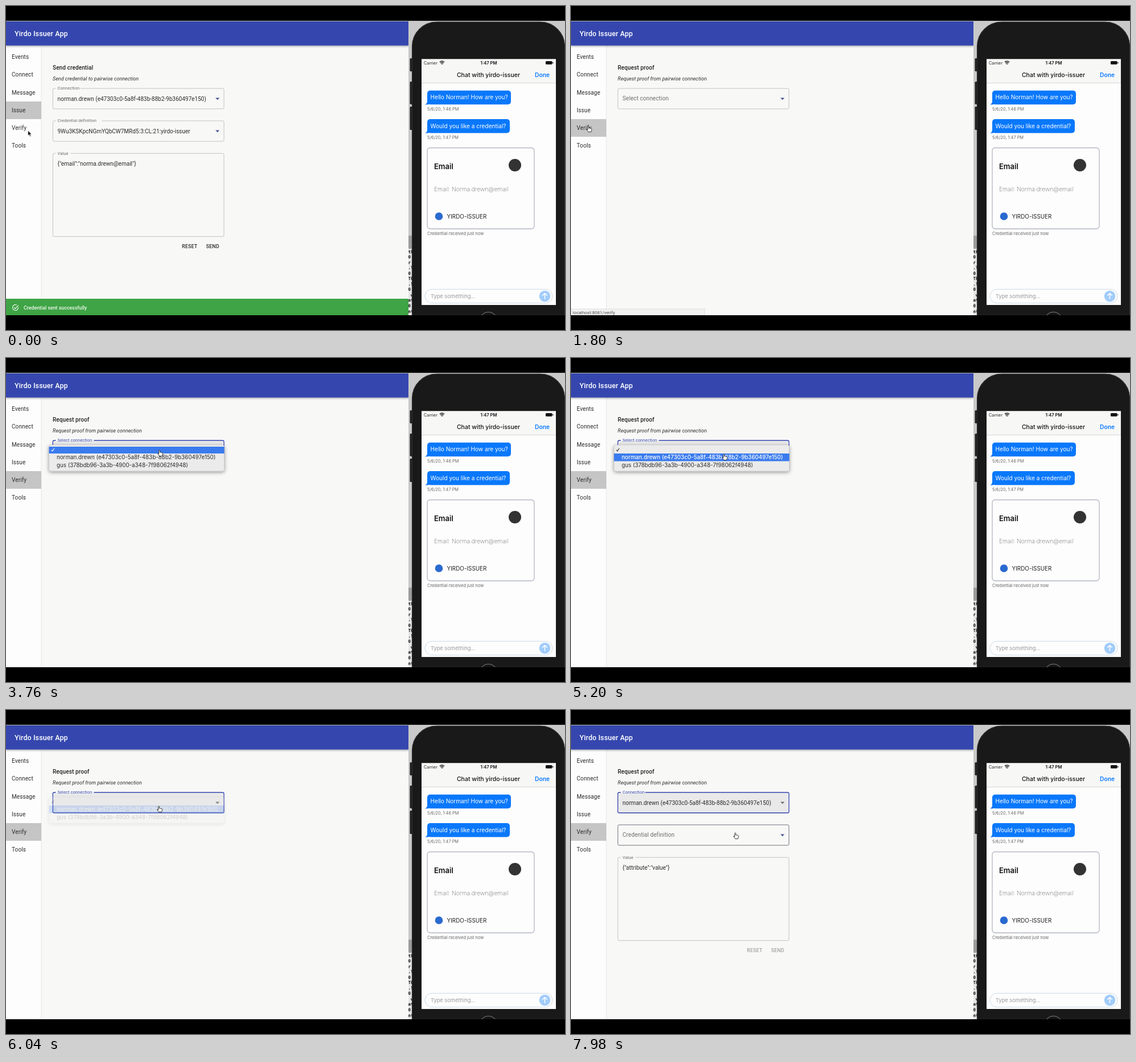
Recreate the animation shown at these times as an HTML page. Size 982 by 570 pixels, loop 8 s.

```html
<!DOCTYPE html>
<html lang="en">
<head>
<meta charset="utf-8">
<title>Issuer demo</title>
<style>
  html, body { margin: 0; width: 100%; height: 100%; overflow: hidden; background: #000; }
  svg { display: block; width: 982px; height: 570px; }
  text { white-space: pre; }
  .web { font-family: Roboto, sans-serif; }
  .ios { font-family: Inter, sans-serif; }
</style>
</head>
<body>
<svg id="stage" viewBox="0 0 982 570"></svg>
<script>
const LOOP = 8000;
const PERSON = "norman.drewn (e47303c0-5a8f-483b-88b2-9b360497e150)";
const OTHER = "gus (378bdb96-3a3b-4900-a348-7f98062f4948)";
const INK = "#2b2b2b", BLUE = "#3546ae", PAPER = "#f8f8f7";

const rect = (x, y, w, h, fill, extra = "") =>
  `<rect x="${x}" y="${y}" width="${w}" height="${h}" fill="${fill}" ${extra}/>`;
const circle = (x, y, r, fill, extra = "") =>
  `<circle cx="${x}" cy="${y}" r="${r}" fill="${fill}" ${extra}/>`;
const path = (d, fill, extra = "") => `<path d="${d}" fill="${fill}" ${extra}/>`;
const group = (id, body, extra = "") => `<g id="${id}" ${extra}>${body}</g>`;
const label = (cls, x, y, size, str, fill = INK, extra = "") =>
  `<text class="${cls}" x="${x}" y="${y}" font-size="${size}" fill="${fill}" ${extra}>${str}</text>`;
const web = (...args) => label("web", ...args);
const ios = (...args) => label("ios", ...args);

// Web app pieces
function field(y, h, name, value, { focus, hover, arrow = true } = {}) {
  const stroke = focus ? BLUE : hover ? "#70707c" : "#c2c2c6";
  let out = rect(82.3, y, 300.6, h, focus ? "#e9e9ea" : "none",
    `rx="2.5" stroke="${stroke}" stroke-width="${focus ? 1.3 : 1}"`);
  if (value === null) {
    out += web(90.5, y + 21, 10, name, "#6c6c6c", 'letter-spacing=".1"');
  } else {
    out += rect(87.5, y - 1, name.length * 3.4 + 9, 2.2, PAPER)
      + web(90.5, y + 2.4, 7.5, name, focus ? BLUE : "#6c6c6c", 'letter-spacing=".07"')
      + web(90.5, y + 21.7, 10, value);
  }
  if (arrow) out += path(`M368 ${y + 16.6}h7l-3.5 3.6z`, focus ? "#6b6b6b" : "#4a549c");
  return out;
}

const heading = (title, note) =>
  web(82, 111.5, 10, title, "#222", 'font-weight="500" letter-spacing=".1"')
  + web(82, 131, 8.9, note, INK, 'font-style="italic" letter-spacing=".08"');

const buttons = fill =>
  web(309, 426, 8.8, "RESET", fill, 'font-weight="500" letter-spacing=".25"')
  + web(351.5, 426, 8.8, "SEND", fill, 'font-weight="500" letter-spacing=".25"');

const selectedRow = y => rect(0, y, 62, 31, "#c5c5c5");

const issuePage = selectedRow(168)
  + heading("Send credential", "Send credential to pairwise connection")
  + field(145, 36, "Connection", PERSON)
  + field(202, 36, "Credential definition", "9Wu3KSKpcNGmYQbCW7MRd5:3:CL:21:yirdo-issuer")
  + field(259.3, 146.3, "Value", '{"email":"norma.drewn@email"}', { arrow: false })
  + buttons(INK)
  + rect(0, 515, 707, 29, "#3fa445")
  + path("M21.5 530a5 5 0 1 1-2.6-3.9M14 530.3l2.2 2.2 5.8-5.8", "none", 'stroke="#fff" stroke-width="1.1"')
  + web(31, 534, 8.8, "Credential sent successfully", "#eef8ee", 'font-weight="500"');

const verifyBase = selectedRow(199) + heading("Request proof", "Request proof from pairwise connection");
const verifyForm = field(145, 36, "Connection", PERSON, { focus: true })
  + group("definition", field(202, 36, "Credential definition", null))
  + group("definitionHover", field(202, 36, "Credential definition", null, { hover: true }))
  + field(259.3, 146.3, "Value", '{"attribute":"value"}', { arrow: false })
  + buttons("#a2a2a2");

const menu = ["Events", "Connect", "Message", "Issue", "Verify", "Tools"]
  .map((name, i) => web(10, 93.3 + i * 31.1, 10, name, INK, 'letter-spacing=".1"')).join("");

function popupRows(active) {
  const ink = i => i === active ? "#fff" : INK;
  const weight = i => `font-weight="${i === active ? 500 : 400}"`;
  return rect(75.5, active ? 168 : 156, 308, active ? 13.5 : 12, "#3a7bee")
    + path("M79.8 161.6l1.7 2.2 3.4-5", "none", `stroke="${ink(0)}" stroke-width="1.1"`)
    + ios(89, 178, 9.75, PERSON, ink(1), weight(1))
    + ios(89, 191.8, 9.75, OTHER, ink(2), weight(2));
}

const popup = rect(75.5, 153, 308, 46, "#ebebeb", 'rx="3.5" stroke="#c0c0c2" stroke-width=".6" filter="url(#lift)"')
  + group("firstRow", popupRows(0)) + group("secondRow", popupRows(1));

const app = rect(0, 26, 707, 518, PAPER)
  + rect(0, 69, 62, 475, "#fdfdfd") + rect(61.5, 69, 1, 475, "#e6e6e5")
  + group("hoverRow", rect(0, 199, 62, 31, "#f1f1f1"))
  + group("issue", issuePage)
  + group("verify", verifyBase
    + group("idle", field(145, 36, "Select connection", null))
    + group("focused", field(145, 36, "Select connection", "", { focus: true }))
    + group("form", verifyForm))
  + menu
  + rect(0, 27, 707, 42.5, BLUE, 'filter="url(#shadow)"')
  + web(15, 53, 12.5, "Yirdo Issuer App", "#fff", 'font-weight="500" letter-spacing=".1"')
  + group("status", `<rect id="statusBox" y="533" height="11" fill="#f1f1f1" stroke="#cfcfcf" stroke-width=".6"/>`
    + label("web", 3, 541.5, 7.9, "localhost:8081/verify", "#505050"))
  + group("popup", popup);

// Phone simulator
const bubble = (y, w, str) =>
  rect(740, y, w, 24.5, "#0a78fb", 'rx="5"')
  + path(`M740 ${y + 15}v5q-.5 3-3.5 4.8q5 .4 8-1.5z`, "#0a78fb")
  + ios(745.5, y + 15.6, 10.1, str, "#fff");
const small = (y, str) => ios(740, y, 7.4, str, "#666");

const logLines = ["th", "0", "r", ".l", "0", "Th", ".l", "0", " w", "at", "0", "nt"]
  .map((str, i) => label("", 706.5, 434.5 + i * 9.55, 7.5, str, "#111",
    `font-family="'DejaVu Sans Mono', monospace" font-weight="700"`)).join("");

const phone = rect(707, 26, 275, 518, "#c9c9c9")
  + rect(707, 404, 8, 23, "#9c9c9c") + rect(707, 427, 8, 117, "#e6e6e6") + logLines
  + [[92, 23], [133, 40], [177, 41]].map(([y, h]) => rect(709.5, y, 6, h, "#202020", 'rx="1.5"')).join("")
  + path("M713.5 544V71A43 43 0 0 1 756.5 28H938.5A43 43 0 0 1 981.5 71V544z", "#191919", 'stroke="#2e2e2e" stroke-width="1.2"')
  + circle(847.5, 553.5, 15, "#141414", 'stroke="#606060" stroke-width="1.4"')
  + rect(730, 93.5, 236, 432.5, "#fdfdfd")
  + rect(730, 93.5, 236, 41.5, "#f7f7f6") + rect(730, 135, 236, .8, "#cfcfcf")
  + ios(734, 102.7, 7.3, "Carrier", "#222")
  + path("M761.8 98.6q4.2-3.6 8.4 0M763.3 100.4q2.7-2.3 5.4 0M764.9 102.2q1.1-1 2.2 0", "none", 'stroke="#222" stroke-width="1.3"')
  + ios(848, 102.7, 7.6, "1:47 PM", "#111", 'font-weight="600" text-anchor="middle"')
  + rect(948, 97, 11.5, 5.8, "#111", 'rx="1.4"') + rect(960.2, 98.7, 1.2, 2.4, "#111")
  + ios(847.5, 124.5, 10.5, "Chat with yirdo-issuer", "#111", 'font-weight="500" text-anchor="middle"')
  + ios(929, 124.5, 10.3, "Done", "#0a7aff", 'font-weight="600"')
  + bubble(148.7, 147, "Hello Norman! How are you?") + small(184, "5/6/20, 1:46 PM")
  + bubble(199, 145, "Would you like a credential?") + small(234.3, "5/6/20, 1:47 PM")
  + rect(740, 249.5, 188, 142.5, "#fdfdfd", 'rx="5" stroke="#b4b6c4" stroke-width="1.3"')
  + ios(752, 287, 13, "Email", "#111", 'font-weight="600"')
  + circle(894, 280, 11, "#333")
  + ios(752, 326, 10.3, "Email: Norma.drewn@email", "#666", 'font-weight="200"')
  + circle(760.5, 370, 6.8, "#2a69cf")
  + ios(774.5, 373.8, 9.9, "YIRDO-ISSUER", "#222")
  + small(403, "Credential received just now")
  + rect(736, 498.3, 224, 24.4, "#fdfdfd", 'rx="12.2" stroke="#cbd8e6"')
  + ios(746, 514, 9.3, "Type something...", "#9a9a9a")
  + circle(946.5, 510.5, 9.8, "#a2ccfa")
  + path("M946.5 515.8v-10M942.3 509.6l4.2-4.2 4.2 4.2", "none", 'stroke="#fff" stroke-width="1.4"');

const topEdge = rect(0, 26, 982, 1, "#b9bbb8");

const arrowCursor = path("M.5 0v9.3l2.2-2 1.5 3.4 1.6-.7-1.5-3.3h2.9z", "#111", 'stroke="#fff" stroke-width=".7"');
const handCursor = path("M2.6 1.2q0-1 .9-1t1 1V4.1q.4-.7 1.3-.3l.4.5q.8-.5 1.5.2q1.4-.3 1.5 1V7.4Q9 9 8.2 10.6H3.7Q2.4 8.5.6 6.7Q.1 5.8 1 5.6L2.6 6.8z",
  "#fff", 'stroke="#222" stroke-width=".9" stroke-linejoin="round"');

document.getElementById("stage").innerHTML =
  `<defs><filter id="shadow" x="-10%" y="-30%" width="120%" height="180%">
     <feDropShadow dx="0" dy="1.5" stdDeviation="1.6" flood-opacity=".35"/></filter>
   <filter id="lift" x="-10%" y="-30%" width="120%" height="180%">
     <feDropShadow dx="0" dy="2" stdDeviation="3" flood-opacity=".4"/></filter>
   <clipPath id="screen"><rect y="26" width="982" height="518"/></clipPath></defs>
   <g clip-path="url(#screen)">${app}${phone}${topEdge}</g>`
  + group("arrow", arrowCursor) + group("hand", handCursor);

// Timeline
const el = id => document.getElementById(id);
const show = (id, on) => el(id).setAttribute("display", on ? "inline" : "none");
const ramp = (t, from, to) => Math.min(1, Math.max(0, (t - from) / (to - from)));

const pointer = [
  [0, 38, 219], [600, 27, 211], [2350, 27, 211], [2850, 236, 221], [3250, 266, 162],
  [4250, 266, 162], [4650, 265, 169], [6950, 265, 169], [7700, 285, 216], [LOOP, 285, 216],
];

function pointerAt(t) {
  const i = pointer.findIndex((key, n) => n && t <= key[0]);
  const [t0, x0, y0] = pointer[i - 1], [t1, x1, y1] = pointer[i];
  const p = ramp(t, t0, t1), k = p * p * (3 - 2 * p);
  return `translate(${x0 + (x1 - x0) * k} ${y0 + (y1 - y0) * k})`;
}

const PAGE = 1750, OPEN = 3350, PICK = 4450, FILLED = 6120;

function draw(t) {
  show("issue", t < PAGE);
  show("verify", t >= PAGE);
  show("hoverRow", t > 150 && t < PAGE);
  show("idle", t < OPEN);
  show("focused", t >= OPEN && t < FILLED);
  show("form", t >= FILLED);
  show("definition", t < 7500);
  show("definitionHover", t >= 7500);

  show("popup", t >= OPEN && t < 6070);
  el("popup").setAttribute("opacity", 1 - ramp(t, 5920, 6070));
  show("firstRow", t < PICK);
  show("secondRow", t >= PICK);

  show("status", t > 350 && t < 2900);
  el("status").setAttribute("opacity", ramp(t, 350, 500) * (1 - ramp(t, 2600, 2900)));
  el("statusBox").setAttribute("width", t < PAGE ? 82 : 235);

  const place = pointerAt(t);
  for (const id of ["arrow", "hand"]) el(id).setAttribute("transform", place);
  show("arrow", t <= 150);
  show("hand", t > 150);
}

function tick() {
  draw(performance.now() % LOOP);
  requestAnimationFrame(tick);
}
tick();
</script>
</body>
</html>
```
